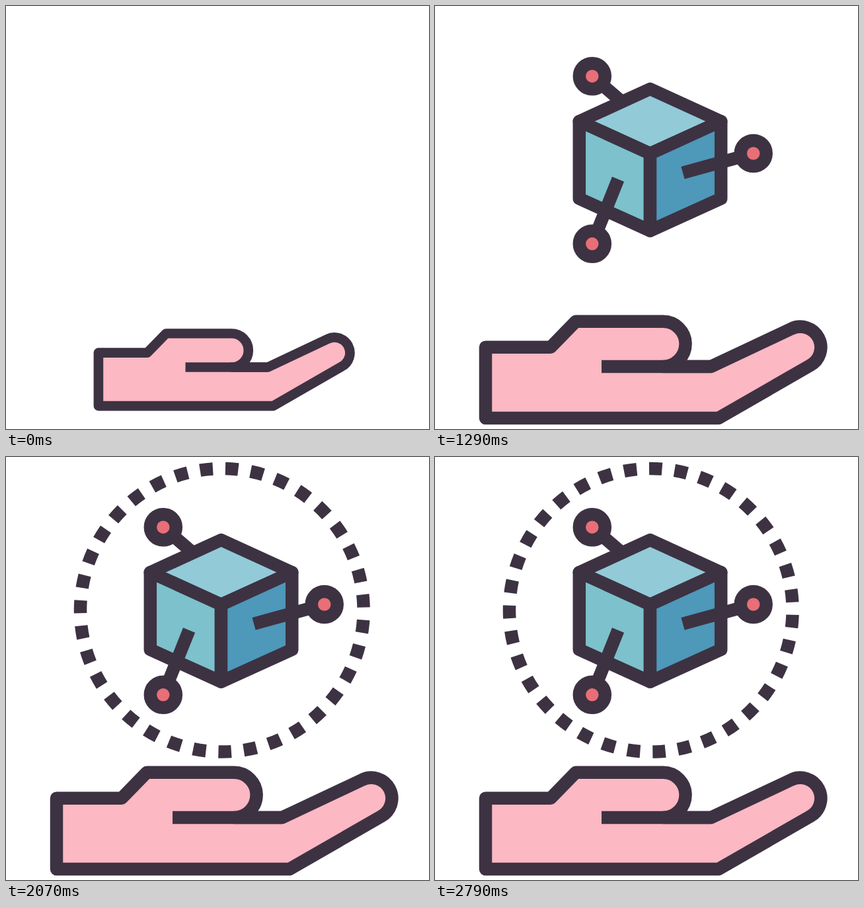
Recreate the animation shown at these times as an HTML page. Size 640 by 640 pixels, loop 2.87 s.

```html
<!DOCTYPE html>
<html lang="en">
<head>
<meta charset="utf-8">
<title>Cube above an open hand</title>
<style>
  html, body { margin: 0; width: 100%; height: 100%; overflow: hidden; background: #fff; }
  svg { display: block; width: 100%; height: 100%; }
  .ink { stroke: #3d3242; stroke-width: 19.5; stroke-linejoin: round; fill: none; }
  .skin { fill: #fcb8c3; }
  .node { fill: #e86f77; }
  .top { fill: #92cad8; }
  .left { fill: #7cc1cb; }
  .right { fill: #4e98ba; }
</style>
</head>
<body>
<svg viewBox="0 0 640 640">
  <g id="hand" class="ink">
    <path class="skin" d="M76.5 516.2H175L213 477.3H345A34 34 0 0 1 345 545.4H418L538.7 488.5A31.2 31.2 0 0 1 567.4 543.9L429 623.5H76.5Z"/>
    <path d="M252 545.4H418"/>
  </g>
  <circle id="ring" class="ink" cx="326.8" cy="231.8" r="214.3" pathLength="35" stroke-dasharray=".507 .493"/>
  <g id="cube" class="ink">
    <path d="M237.8 106.2L281 143.5"/>
    <path class="top" d="M325.5 125.5L432.7 174.5 325.5 223.3 218.3 174.5Z"/>
    <path class="left" d="M218.3 174.5L325.5 223.3V340L218.3 291.4Z"/>
    <path class="right" d="M432.7 174.5L325.5 223.3V340L432.7 291.4Z"/>
    <path d="M481.7 223L375 252.3M237.8 359.8L277 262"/>
    <g class="node">
      <circle cx="237.8" cy="106.2" r="19.5"/>
      <circle cx="481.7" cy="223" r="19.5"/>
      <circle cx="237.8" cy="359.8" r="19.5"/>
    </g>
  </g>
</svg>
<script>
  const LOOP = 2870, FPS = 14, LAST = 39;
  const [hand, ring, cube] = ['hand', 'ring', 'cube'].map(id => document.getElementById(id));

  const ease = (x, a, b) => {
    const u = Math.min(1, Math.max(0, (x - a) / (b - a)));
    return u * u * (3 - 2 * u);
  };

  // Scale from 0.75 past full size, then settle at 1.
  const pop = (x, start, mid, end, peak) =>
    0.75 + (peak - 0.75) * ease(x, start, mid) - (peak - 1) * ease(x, mid, end);

  const scale = (el, s, x, y) =>
    el.setAttribute('transform', `translate(${x} ${y}) scale(${s}) translate(${-x} ${-y})`);

  const show = (el, on) => el.setAttribute('visibility', on ? 'visible' : 'hidden');

  // The motion advances in ticks, timed to whole centiseconds.
  const tickAt = ms => Math.min(LAST, Math.floor((Math.floor(ms / 10) * 10 + 4.9) * FPS / 1000));

  function draw(n) {
    scale(hand, pop(n, 0, 2, 4, 1.027), 330, 550);
    show(cube, n >= 13);
    scale(cube, pop(n, 13, 16, 18, 1.1), 360, 232);
    show(ring, n >= 20);
    const turn = -2.94 + 180 * ease(n, 20.1, 39.5);
    ring.setAttribute('transform', `rotate(${turn} 326.8 231.8)`);
  }

  const t0 = performance.now();
  function loop() {
    draw(tickAt((performance.now() - t0) % LOOP));
    requestAnimationFrame(loop);
  }
  loop();
</script>
</body>
</html>
```
